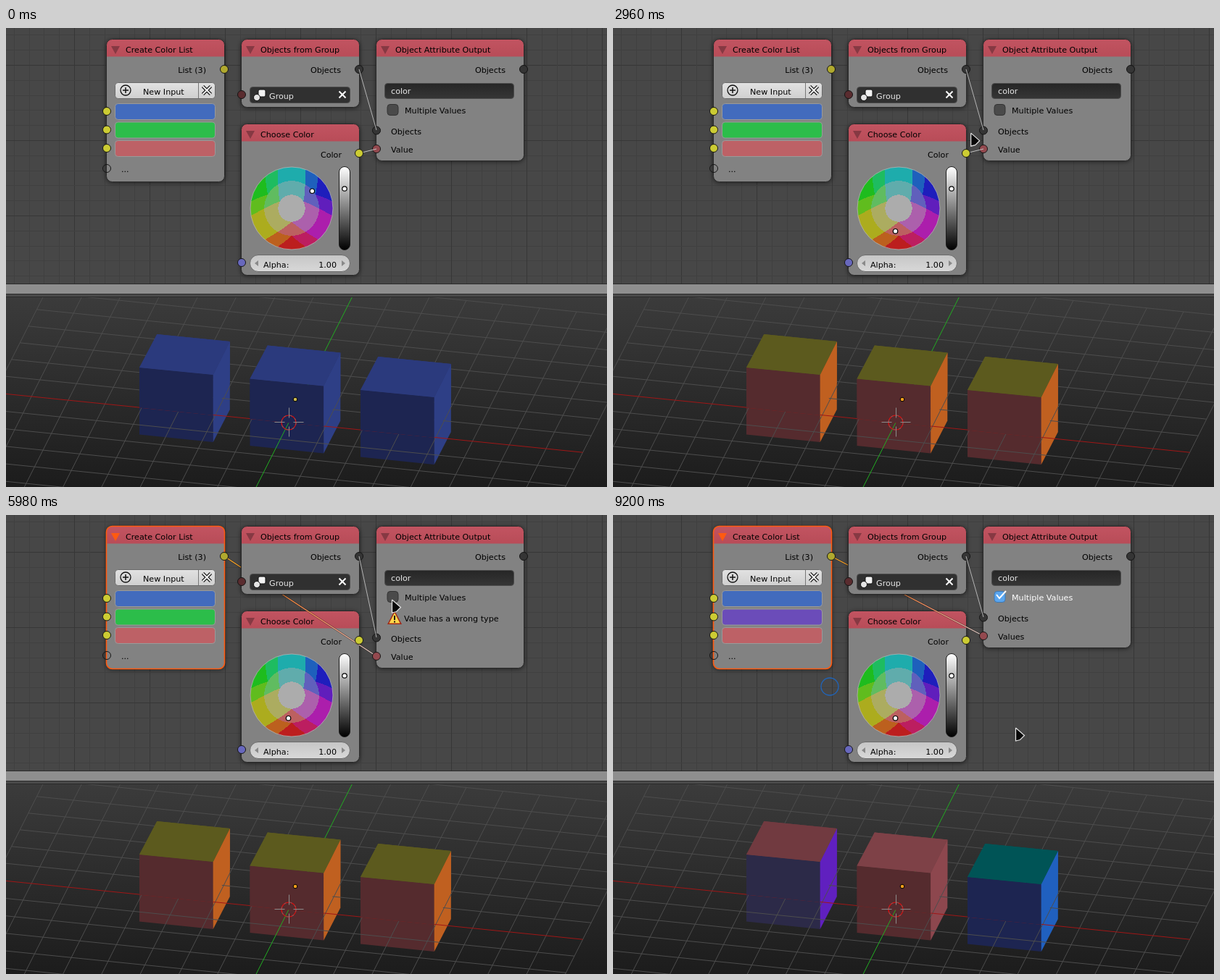
Write an HTML page with a canvas that moves like this. It is 829 px wide and 634 px high and loops after 9.24 s.

```html
<!DOCTYPE html>
<html>
<head>
<meta charset="utf-8">
<style>
html, body { margin: 0; width: 100%; height: 100%; overflow: hidden; background: #464646; }
canvas { display: block; }
</style>
</head>
<body>
<canvas id="stage" width="829" height="634"></canvas>
<script>
const ctx = document.getElementById('stage').getContext('2d');
const LOOP = 9240, TAU = Math.PI * 2;

// Keys are [time, ...values], joined linearly.
function track(keys, t) {
  if (t <= keys[0][0]) return keys[0].slice(1);
  const i = keys.findIndex(k => k[0] > t);
  if (i < 0) return keys[keys.length - 1].slice(1);
  const a = keys[i - 1], b = keys[i], p = (t - a[0]) / (b[0] - a[0]);
  return a.slice(1).map((v, n) => v + (b[n + 1] - v) * p);
}
const SPIN = [[310, 40, 37], [1200, 113, 37], [1540, 192, 38], [1920, 262, 32]];
const POINTER = [[2300, 390, 285], [2840, 478, 131], [2960, 493, 145], [3080, 514, 164],
  [3130, 514, 164], [3400, 514, 227], [3460, 514, 227], [4000, 300, 56], [4120, 300, 56],
  [4510, 488, 207], [4620, 513, 219], [4710, 513, 198], [4920, 513, 198], [5080, 530, 196],
  [5370, 530, 196], [5900, 532, 117], [6320, 532, 117], [6680, 606, 190], [6880, 590, 258],
  [7230, 324, 212], [7270, 322, 210], [7410, 212, 132], [7680, 212, 132], [8200, 275, 220],
  [8260, 275, 220], [8740, 299, 237], [9000, 299, 237], [9180, 555, 294]];
const PRESSES = [[340, 2180], [3120, 3400], [4100, 4920], [6060, 6180], [7600, 7660], [8250, 8990]];

// A hue wheel whose colours are reduced to a few levels per channel.
function makeWheel(x, y, r) {
  const image = document.createElement('canvas');
  image.width = image.height = 2 * r;
  const pen = image.getContext('2d');
  for (let px = 0; px < 2 * r; px++) for (let py = 0; py < 2 * r; py++) {
    const dx = px + .5 - r, dy = py + .5 - r, s = Math.min(1, Math.hypot(dx, dy) / r);
    const hue = (270 + Math.atan2(dy, dx) * 360 / TAU) / 60;
    const levels = [5, 3, 1].map(n => {
      const k = (n + hue) % 6;
      return Math.floor(190 * (1 - s * Math.max(0, Math.min(k, 4 - k, 1))) / 64);
    });
    const high = levels.filter(v => v === 2).length === 1 ? 188 : 172;
    pen.fillStyle = `rgb(${levels.map(v => [30, 96, high][v])})`;
    pen.fillRect(px, py, 1, 1);
  }
  return { x, y, r, image };
}
const WHEEL = makeWheel(394, 249, 57), PICKER = makeWheel(247, 248, 84);

function wheelPoint(t) {
  const [deg, r] = track(SPIN, t), a = deg * TAU / 360;
  return [WHEEL.x + r * Math.cos(a), WHEEL.y - r * Math.sin(a)];
}
const pointerAt = t => t < 2180 ? wheelPoint(t) : track(POINTER, t);

function poly(fill, ...pts) {
  ctx.beginPath();
  pts.forEach(p => ctx.lineTo(...p));
  ctx.closePath();
  ctx.fillStyle = fill;
  ctx.fill();
}
function line(color, width, ...pts) {
  ctx.beginPath();
  pts.forEach(p => ctx.lineTo(...p));
  ctx.strokeStyle = color;
  ctx.lineWidth = width;
  ctx.stroke();
}
function circle(x, y, r, fill, stroke, width = 1) {
  ctx.beginPath();
  ctx.arc(x, y, r, 0, TAU);
  if (fill) { ctx.fillStyle = fill; ctx.fill(); }
  if (stroke) { ctx.strokeStyle = stroke; ctx.lineWidth = width; ctx.stroke(); }
}
function box(x, y, w, h, r, fill, stroke) {
  ctx.beginPath();
  ctx.roundRect(x, y, w, h, r);
  ctx.fillStyle = fill;
  ctx.fill();
  if (stroke) { ctx.strokeStyle = stroke; ctx.lineWidth = 1; ctx.stroke(); }
}
function text(s, x, y, color = '#000', align = 'left') {
  ctx.font = '11.15px "DejaVu Sans", sans-serif';
  ctx.textAlign = align;
  ctx.fillStyle = color;
  ctx.fillText(s, x, y);
}
function fade(x0, y0, x1, y1, ...colors) {
  const g = ctx.createLinearGradient(x0, y0, x1, y1);
  colors.forEach((c, i) => g.addColorStop(i / (colors.length - 1), c));
  return g;
}
const socket = (x, y, fill) => circle(x, y, 5.5, fill, '#151515');

function node(x, y, w, h, title, selected) {
  ctx.save();
  ctx.shadowColor = 'rgba(0,0,0,.6)';
  ctx.shadowBlur = 6;
  ctx.shadowOffsetY = 1;
  box(x, y, w, h, 8, '#828282');
  ctx.restore();
  box(x, y, w, 24, [8, 8, 0, 0], fade(0, y, 0, y + 24, '#c25461', '#b84c58'));
  ctx.beginPath();
  ctx.roundRect(x, y, w, h, 8);
  ctx.strokeStyle = selected ? '#ff5a10' : '#2a2a2a';
  ctx.lineWidth = selected ? 1.6 : 1;
  ctx.stroke();
  poly(selected ? '#ff5a10' : '#863943', [x + 6.5, y + 9.5], [x + 18.5, y + 9.5], [x + 12.5, y + 20.5]);
  text(title, x + 26.5, y + 18.5);
}

function colorWheel({ x, y, r, image }) {
  ctx.save();
  ctx.beginPath();
  ctx.arc(x, y, r, 0, TAU);
  ctx.clip();
  ctx.drawImage(image, x - r, y - r);
  ctx.restore();
  circle(x, y, r, null, '#b4b4b4', .8);
}
const marker = (x, y) => circle(x, y, 3.2, '#fff', '#000', 1.2);
const valueBar = (x, y, w, h) =>
  box(x, y, w, h, w / 2, fade(0, y, 0, y + h, '#fff', '#808080', '#000'), '#1c1c1c');

// Face colours: [top, front, right]
const BLUE = ['#2b3a7d', '#1d2551', '#2e3f86'], AZURE = ['#005456', '#1d2551', '#2060bf'],
  CYAN = ['#005456', '#005456', '#20acac'], GREEN = ['#005400', '#005400', '#20ac20'],
  LIME = ['#5c5a1e', '#5c5a1e', '#60c020'], YELLOW = ['#5c5a1e', '#5c5a1e', '#acac20'],
  ORANGE = ['#5c5a1e', '#552b2e', '#c06020'], ROSE = ['#7e4147', '#552b2e', '#8d474e'],
  VIOLET = ['#713a40', '#2c2a48', '#6020bf'];
const STEPS = [[242, ORANGE], [205, YELLOW], [160, LIME], [118, GREEN], [80, CYAN], [48, AZURE], [0, BLUE]];

function cubeColors(t) {
  if (t >= 6180) return [t < 8270 ? GREEN : t < 8600 ? AZURE : VIOLET, ROSE, AZURE];
  const c = STEPS.find(s => track(SPIN, t - 50)[0] >= s[0])[1];
  return [c, c, c];
}
// The ground plane cuts each cube, so its upper part is painted again over the grid.
function cubes(colors, upper) {
  colors.forEach(([top, front, right], i) => {
    const at = (x, y) => [184 + 152.5 * i + x, 469 + 15.5 * i + y], cut = upper ? 37 : 0;
    poly(front, at(0, 0), at(101.7, 10), at(101.7, 103 - cut), at(0, 92.5 - cut));
    poly(right, at(101.7, 10), at(124.8, -36), at(124.8, 58 - cut), at(101.7, 103 - cut));
    poly(top, at(0, 0), at(24.3, -46), at(124.8, -36), at(101.7, 10));
  });
}
const ground = (u, v) => [390 + 50.7 * u + 11.6 * v, 545 + 5.15 * u - 23 * v];

function viewport(t) {
  ctx.save();
  ctx.beginPath();
  ctx.rect(0, 372, 829, 262);
  ctx.clip();
  ctx.fillStyle = fade(0, 372, 0, 634, '#3b3b3b', '#1c1c1c');
  ctx.fillRect(0, 372, 829, 262);
  const colors = cubeColors(t);
  cubes(colors, false);
  for (let i = -8; i <= 8; i++) {
    if (!i) continue;
    line('#4d4d4d', 1, ground(i, -8), ground(i, 8));
    line('#4d4d4d', 1, ground(-8, i), ground(8, i));
  }
  line('#a01616', 1, ground(-8, 0), ground(8, 0));
  line('#22ac22', 1, ground(0, -8), ground(0, 8));
  cubes(colors, true);

  circle(390, 545, 10, null, '#e01010', 1.2);
  ctx.setLineDash([3, 5]);
  circle(390, 545, 10, null, '#8c5050', 1.2);
  ctx.setLineDash([]);
  for (const [dx, dy] of [[1, 0], [-1, 0], [0, 1], [0, -1]])
    line('#8c8c8c', 1, [390.5 + dx * 6, 544.5 + dy * 6], [390.5 + dx * 20, 544.5 + dy * 20]);
  circle(399, 513, 2.8, t < 340 ? '#cdbb50' : '#ffa01c', '#000');
  ctx.restore();
}

function backdrop() {
  ctx.fillStyle = '#474747';
  ctx.fillRect(0, 0, 829, 354);
  for (let i = -5; i < 45; i++) {
    const color = i % 5 ? '#404040' : '#373737', x = Math.round(94 + i * 20.8) + .5, y = Math.round(51 + i * 20.8) + .5;
    line(color, 1, [x, 0], [x, 354]);
    if (y < 354) line(color, 1, [0, y], [829, y]);
  }
  ctx.fillStyle = '#2b2b2b';
  ctx.fillRect(0, 353, 829, 19);
  ctx.fillStyle = '#8e8e8e';
  ctx.fillRect(0, 354, 829, 13);
  ctx.fillStyle = '#4a4a4a';
  ctx.fillRect(0, 368, 829, 3);
}

function listNode(t) {
  node(138.5, 15.5, 163, 197, 'Create Color List', t >= 4140);
  text('List (3)', 276, 62, undefined, 'right');
  box(150.5, 75.5, 138, 22, 4, fade(0, 75, 0, 98, '#e2e2e2', '#cfcfcf'), '#6a6a6a');
  line('#777', 1, [265.5, 76], [265.5, 97]);
  circle(165, 86, 7, null, '#111', 1.3);
  line('#111', 1.5, [161, 86], [169, 86]);
  line('#111', 1.5, [165, 82], [165, 90]);
  text('New Input', 189, 91.5);
  for (const [color, width] of [['#111', 4.5], ['#f4f4f4', 2]]) {
    line(color, width, [271.5, 80.5], [282.5, 91.5]);
    line(color, width, [282.5, 80.5], [271.5, 91.5]);
  }
  const second = t < 8270 ? '#2cbd4a' : t < 8450 ? '#426bbd' : t < 8680 ? '#5858bd' : '#6b4cb9';
  ['#426bbd', second, '#bd6166'].forEach((c, i) => {
    box(150.5, 104.5 + 25.5 * i, 138, 22, 4, c, '#9a9a9a');
    socket(139, 115 + 25.5 * i, '#cccc33');
  });
  text('...', 159, 199);
  socket(139, 194);
  socket(301, 57, '#b0a92e');
}

function groupNode() {
  node(324.5, 15.5, 163, 94, 'Objects from Group');
  text('Objects', 462, 62, undefined, 'right');
  box(336.5, 81.5, 138, 22, 4, '#303030', '#4c4c4c');
  box(348, 85, 10, 10, 2, '#f2f2f2', '#111');
  circle(346, 96, 4.5, '#e4e4e4', '#111');
  text('Group', 363, 97.5, '#e8e8e8');
  line('#fff', 2, [459.5, 87.5], [468.5, 96.5]);
  line('#fff', 2, [468.5, 87.5], [459.5, 96.5]);
  socket(325, 92, '#5a2c2f');
  socket(487, 57, '#353535');
}

function colorNode(t) {
  node(324.5, 132.5, 163, 209, 'Choose Color');
  text('Color', 463, 178.5, undefined, 'right');
  colorWheel(WHEEL);
  marker(...wheelPoint(t - 50));
  valueBar(459.5, 191.5, 15, 115);
  marker(467, 222);
  box(336.5, 313.5, 138, 23, 11.5, fade(0, 314, 0, 336, '#c6c6c6', '#d8d8d8'), '#6a6a6a');
  poly('#8a8a8a', [348, 321], [348, 329], [343, 325]);
  poly('#8a8a8a', [463, 321], [463, 329], [468, 325]);
  text('Alpha:', 355, 331);
  text('1.00', 456, 331, undefined, 'right');
  socket(325, 324, '#6868bd');
}

function outputNode(wrong, checked) {
  const drop = wrong ? 28 : 0;
  node(510.5, 15.5, 204, 168 + drop, 'Object Attribute Output');
  text('Objects', 689, 62, undefined, 'right');
  box(522.5, 76.5, 178, 21, 4, fade(0, 76, 0, 98, '#262626', '#363636'), '#4c4c4c');
  text('color', 531, 91, '#e8e8e8');
  box(526, 105.5, 15, 15, 4, checked ? '#5aa5ee' : '#4a4a4a', checked ? '#3c78b4' : '#333');
  if (checked) line('#fff', 2, [529, 110], [533, 115], [542, 105]);
  text('Multiple Values', 550, 118, checked ? '#fff' : undefined);
  if (wrong) {
    poly('#a02818', [536, 132], [546, 151], [526, 151]);
    poly('#ffd84a', [536, 135], [543.5, 149.5], [528.5, 149.5]);
    line('#111', 2, [536, 139], [536, 145]);
    line('#111', 2, [536, 146.5], [536, 148.5]);
    text('Value has a wrong type', 549, 147);
  }
  text('Objects', 531, 147 + drop);
  text(checked ? 'Values' : 'Value', 531, 172 + drop);
  socket(714, 57, '#353535');
  socket(511, 141.5 + drop, '#353535');
  socket(511, 167 + drop, '#94494f');
}

function picker(t) {
  box(152, 155, 220, 310, 5, 'rgba(30,30,30,.93)', '#111');
  colorWheel(PICKER);
  valueBar(345, 164, 15, 168);
  marker(352.5, 208);
  marker(...(t < 8250 ? [206, 205] : pointerAt(t - 50)));
  ['RGB', 'HSV', 'Hex'].forEach((s, i) => {
    box(162 + 67 * i, 343, 66, 22, 3, i ? '#555' : '#5680c2');
    text(s, 195 + 67 * i, 358, '#eee', 'center');
  });
  const rgb = t < 8270 ? ['0.025', '0.509', '0.068'] : t < 8600 ? ['0.054', '0.147', '0.509'] : ['0.147', '0.072', '0.485'];
  ['R:', 'G:', 'B:', 'A:'].forEach((s, i) => {
    box(162, 372 + 22 * i, 200, 20, 9, '#b4b4b4');
    text(s, 174, 386 + 22 * i);
    text(rgb[i] || '1.000', 350, 386 + 22 * i, undefined, 'right');
  });
}

function pointer(t) {
  const [x, y] = pointerAt(t);
  for (const [from, to] of PRESSES) {
    if (t >= from && t < to) circle(x + .5, y + (t < 2180 ? 0 : 1), 8, 'rgba(40,155,225,.7)');
    const age = t - to;
    if (age >= 0 && age < 250)
      circle(...pointerAt(to), 8 + Math.min(4, age / 40), null, '#2064b8', 1.3);
  }
  if (t < 2200 || (t >= 8250 && t < 8990)) return;
  const shape = [[0, 0], [0, 18], [6, 16.5], [12, 10.5]].map(p => [x + p[0] + .5, y + p[1]]);
  poly('#080808', ...shape);
  line('#e4e4e4', 1.2, ...shape, shape[0]);
}

function draw(t) {
  const wrong = t >= 3300 && t < 6180, checked = t >= 6180;
  const drop = wrong ? 28 : 0, list = [301, 57], value = [511, 167 + drop];
  backdrop();
  viewport(t);
  colorNode(t);
  if (t >= 4920) {
    line('rgba(40,25,20,.6)', 2.2, list, value);
    line(fade(...list, ...value, '#ffb428', '#ff8c32', '#ff9a70', '#d8d0d0'), 1.2, list, value);
  }
  listNode(t);
  groupNode();
  outputNode(wrong, checked);
  line('#b4b4b4', 1, [487, 57], [511, 141 + drop]);
  if (t < 3400) line('#c4c4c4', 1, [487, 173], t < 3150 ? value : pointerAt(t - 30));
  socket(487, 173, '#cccc33');
  if (t >= 4140 && t < 4920) {
    const end = pointerAt(t - 30);
    line('rgba(50,20,10,.7)', 2.6, list, end);
    line('#ff6418', 1.4, list, end);
  }
  if (t >= 7680 && t < 9110) picker(t);
  pointer(t);
}

function tick() {
  draw(performance.now() % LOOP);
  requestAnimationFrame(tick);
}
tick();
</script>
</body>
</html>
```
